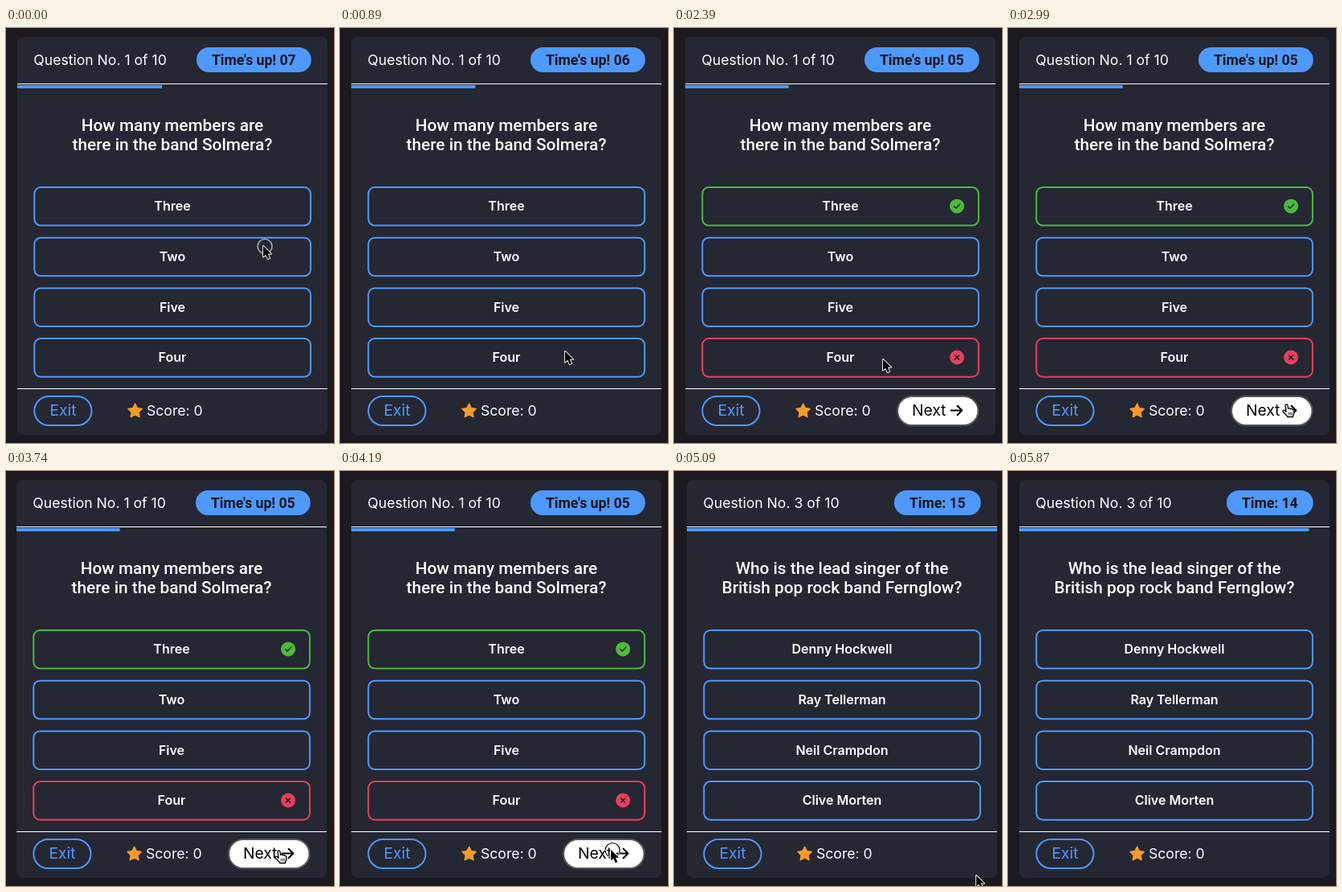
Recreate the animation shown at these times as an HTML page with a canvas. Size 408 px wide and 516 px high, loop 6.01 s.

```html
<!DOCTYPE html>
<html lang="en">
<head>
<meta charset="utf-8">
<title>Music quiz</title>
<style>
  html, body { margin: 0; width: 100%; height: 100%; overflow: hidden; background: #1c1a20; }
  canvas { display: block; width: 408px; height: 516px; }
</style>
</head>
<body>
<canvas id="stage"></canvas>
<script>
const LOOP = 6010, W = 408, H = 516;
const BLUE = '#4e99ff', GREEN = '#4dba3b', RED = '#eb3d5c', PANEL = '#252733', WHITE = '#fff', INK = '#17161b';
const INTER = 'Inter, sans-serif', ROBOTO = 'Roboto, sans-serif';

const canvas = document.getElementById('stage');
const ctx = canvas.getContext('2d');
const ratio = window.devicePixelRatio || 1;
canvas.width = W * ratio;
canvas.height = H * ratio;

const quiz = {
  first: {
    no: 1,
    lines: ['How many members are', 'there in the band Solmera?'],
    answers: ['Three', 'Two', 'Five', 'Four']
  },
  second: {
    no: 3,
    lines: ['Who is the lead singer of the', 'British pop rock band Fernglow?'],
    answers: ['Denny Hockwell', 'Ray Tellerman', 'Neil Crampdon', 'Clive Morten']
  }
};

// Each track is [start ms, value...]; the latest started entry holds.
const pointer = [
  [0, 320, 271, 'arrow', true], [150, 317, 288, 'arrow'], [290, 298, 346, 'arrow'],
  [440, 281, 398, 'arrow'], [890, 280, 402, 'arrow'], [1190, 274, 406, 'hand'],
  [1340, 268, 409, 'hand'], [1490, 263, 412, 'hand'], [1640, 260, 412, 'hand'],
  [2240, 260, 412, 'arrow', true], [2390, 260, 412, 'arrow'], [2690, 306, 447, 'arrow'],
  [2840, 334, 463, 'hand'], [2990, 345, 468, 'hand'], [3140, 353, 473, 'hand'],
  [3440, 338, 472, 'hand'], [4190, 337, 471, 'arrow', true], [4340, 337, 471, 'arrow'],
  [4640, 345, 480, 'arrow'], [5090, 376, 503, 'arrow'], [5240, 380, 512, 'arrow'],
  [5390, 0, 0, 'none']
];
const sway = [[0, 0], [2690, 1], [2990, 0], [3740, -1], [4040, 0], [4640, 1], [5090, 2], [5720, 1], [5870, 0]];
const clock = [[0, 7], [740, 6], [1790, 5], [4340, 15], [5390, 14]];

function at(track, t) {
  let hit = track[0];
  for (const step of track) if (step[0] <= t) hit = step;
  return hit.slice(1);
}

function text(str, x, y, font, color = WHITE, align = 'left') {
  ctx.font = font;
  ctx.fillStyle = color;
  ctx.textAlign = align;
  ctx.fillText(str, x, y);
}

function box(x, y, w, h, r, fill, stroke) {
  ctx.beginPath();
  ctx.roundRect(x, y, w, h, r);
  if (fill) { ctx.fillStyle = fill; ctx.fill(); }
  if (stroke) { ctx.strokeStyle = stroke; ctx.lineWidth = 2; ctx.stroke(); }
}

function line(points, color, width) {
  ctx.beginPath();
  points.forEach(([x, y], i) => i ? ctx.lineTo(x, y) : ctx.moveTo(x, y));
  ctx.strokeStyle = color;
  ctx.lineWidth = width;
  ctx.lineCap = ctx.lineJoin = 'round';
  ctx.stroke();
}

function disc(x, y, r, color) {
  ctx.beginPath();
  ctx.arc(x, y, r, 0, Math.PI * 2);
  ctx.fillStyle = color;
  ctx.fill();
}

function star(x, y, r) {
  ctx.beginPath();
  for (let i = 0; i < 10; i++) {
    const a = i * Math.PI / 5 - Math.PI / 2, d = i % 2 ? r * 0.5 : r;
    ctx.lineTo(x + d * Math.cos(a), y + d * Math.sin(a));
  }
  ctx.closePath();
  ctx.fillStyle = ctx.strokeStyle = '#f99a29';
  ctx.lineWidth = 1.6;
  ctx.lineJoin = 'round';
  ctx.fill();
  ctx.stroke();
}

function header(q, seconds, over) {
  text(`Question No. ${q.no} of 10`, 34.3, 46, `400 17.6px ${INTER}`);
  const label = (over ? "Time's up! " : 'Time: ') + String(seconds).padStart(2, '0');
  const font = `700 17.6px ${ROBOTO}`;
  ctx.font = font;
  const w = ctx.measureText(label).width + 38;
  box(379.7 - w, 24, w, 31, 15.5, BLUE);
  text(label, 379.7 - w / 2, 46, font, INK, 'center');
  ctx.fillStyle = WHITE;
  ctx.fillRect(14, 69, 386, 1);
  ctx.fillStyle = BLUE;
  ctx.fillRect(14, 71, 386 * seconds / 15, 4);
}

function answer(label, i, state) {
  const y = 197 + i * 62.7;
  const edge = { right: GREEN, wrong: RED }[state] || BLUE;
  box(35.3, y + 1, 343.6, 47.6, 8, state === 'hover' && BLUE, edge);
  text(label, 207, y + 30.2, `600 16px ${INTER}`, WHITE, 'center');
  const cy = y + 24.4;
  if (state === 'right') {
    disc(352, cy, 9, GREEN);
    line([[348.5, cy + 0.3], [351, cy + 2.7], [355.7, cy - 2.5]], INK, 1.4);
  }
  if (state === 'wrong') {
    disc(352, cy, 9, RED);
    line([[349.5, cy - 2.5], [354.5, cy + 2.5]], INK, 1.7);
    line([[354.5, cy - 2.5], [349.5, cy + 2.5]], INK, 1.7);
  }
}

function footer(next) {
  ctx.fillStyle = WHITE;
  ctx.fillRect(14, 448, 386, 1);
  box(35.3, 458, 71.2, 36, 18, null, BLUE);
  text('Exit', 71, 482.3, `400 19.2px ${INTER}`, BLUE, 'center');
  star(160.6, 476.3, 9);
  text('Score: 0', 175, 482, `400 17.6px ${INTER}`);
  if (!next) return;
  box(278, 458, 100.4, 36, 18, WHITE, '#55555a');
  text('Next', 296, 482.3, `400 19.2px ${INTER}`, '#000');
  line([[344.5, 475.5], [358, 475.5]], '#000', 2);
  line([[352.5, 469.8], [358.2, 475.5], [352.5, 481.2]], '#000', 2);
}

const arrowPath = new Path2D('M0 0V13.6L3.2 10.7L5.6 16.2L8.2 15.1L5.8 9.8H10Z');
const handPath = new Path2D('M0 1.3C0-.5 2.6-.5 2.9 1.3L3.5 5.3C4.3 4.4 5.8 4.7 6.1 5.8C7 5 8.3 5.4 8.6 6.5C9.7 6 10.7 6.7 10.7 8V10.5C10.7 12.5 9.4 13.4 9.4 15.5H2.8C2.4 13-1-.2-3.5 8.8C-4.2 7.2-2.4 6.4-1.3 7.5L1 9.5Z');
const hand = new Path2D('M0 1.3C0-.5 2.6-.5 2.9 1.3L3.5 5.3C4.3 4.4 5.8 4.7 6.1 5.8C7 5 8.3 5.4 8.6 6.5C9.7 6 10.7 6.7 10.7 8V10.5C10.7 12.5 9.4 13.4 9.4 15.5H2.6C2.2 13.4-1.6 11.4-3 8.9C-3.5 7.3-1.9 6.6-.9 7.5L1 9.2Z');

function drawPointer([x, y, kind, pressed]) {
  if (kind === 'none') return;
  ctx.save();
  ctx.translate(x, y);
  ctx.lineJoin = 'round';
  if (pressed) {
    ctx.globalCompositeOperation = 'difference';
    ctx.beginPath();
    ctx.arc(2, 0.5, 9, 0, Math.PI * 2);
    ctx.strokeStyle = WHITE;
    ctx.lineWidth = 1.2;
    ctx.stroke();
    ctx.globalCompositeOperation = 'source-over';
  }
  if (kind === 'arrow') {
    ctx.strokeStyle = WHITE;
    ctx.lineWidth = 1.8;
    ctx.stroke(arrowPath);
    ctx.fillStyle = '#000';
    ctx.fill(arrowPath);
  } else {
    ctx.fillStyle = WHITE;
    ctx.strokeStyle = '#000';
    ctx.lineWidth = 1.3;
    ctx.fill(hand);
    ctx.stroke(hand);
    for (const fx of [4.2, 6.2, 8.2]) line([[fx, 10], [fx, 13]], '#000', 0.8);
  }
  ctx.restore();
}

function draw(t) {
  const q = t < 4340 ? quiz.first : quiz.second;
  const answered = t >= 2390 && t < 4340;
  const hovering = t >= 1190 && t < 2390;

  ctx.setTransform(ratio, 0, 0, ratio, 0, 0);
  ctx.fillStyle = '#1c1a20';
  ctx.fillRect(0, 0, W, H);
  ctx.save();
  ctx.translate(at(sway, t)[0], 0);
  box(14, 11, 386, 495, 8, PANEL);
  header(q, at(clock, t)[0], q === quiz.first);
  q.lines.forEach((s, i) => text(s, 207, 128 + i * 24.3, `500 20.8px ${ROBOTO}`, WHITE, 'center'));
  q.answers.forEach((s, i) => {
    let state = '';
    if (answered) state = ['right', '', '', 'wrong'][i];
    else if (hovering && i === 3) state = 'hover';
    answer(s, i, state);
  });
  footer(answered);
  ctx.restore();
  drawPointer(at(pointer, t));
}

const start = performance.now();
function tick() {
  draw((performance.now() - start) % LOOP);
  requestAnimationFrame(tick);
}
tick();
</script>
</body>
</html>
```
